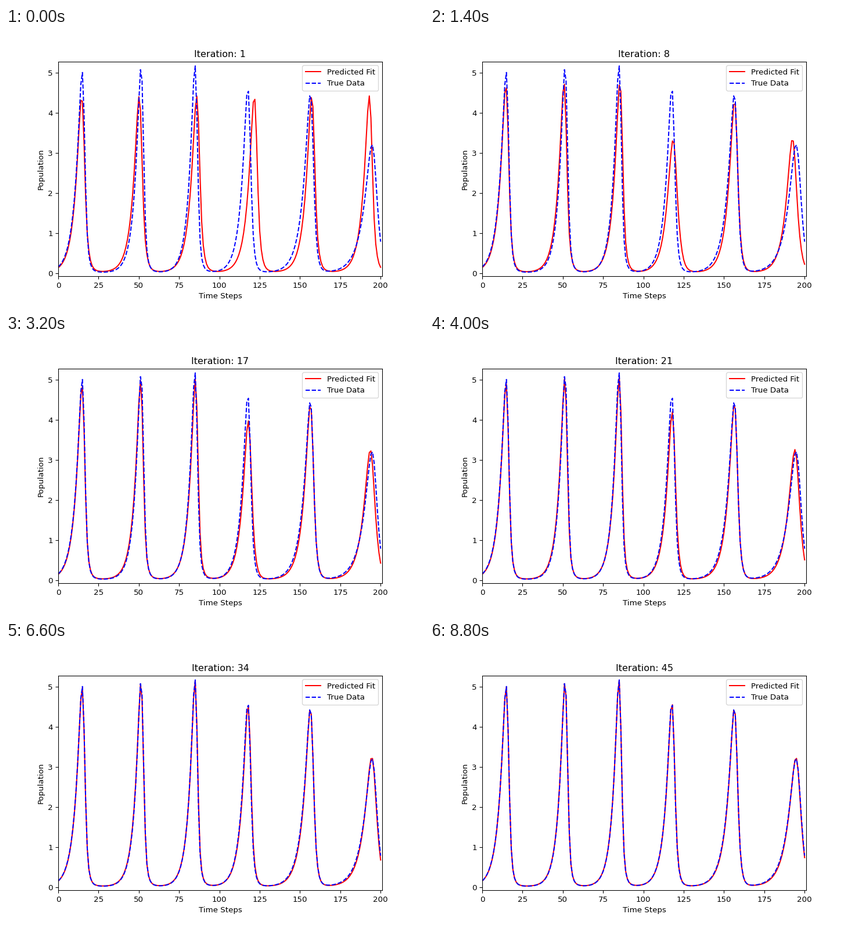
Animation, 720 px wide and 480 px high, one loop 9000 ms. Source, as a matplotlib script:

```python
import numpy as np
import matplotlib.pyplot as plt
from matplotlib.animation import FuncAnimation

FRAMES = 45
STEPS = np.arange(201)

# The data: six peaks whose growth rate drifts slowly over time
TRUE_TIME = np.array([14.8, 51.35, 84.8, 117.6, 156.4, 194.7])
TRUE_HEIGHT = np.array([5.02, 5.15, 5.19, 4.62, 4.47, 3.20])
TRUE_RISE = 0.238 + 0.055 * np.sin(2 * np.pi * TRUE_TIME / 290)

# The first guess: a strictly periodic cycle
START_TIME = 14.5 + 35.7 * np.arange(6)
START_HEIGHT = 4.40
START_RISE = 0.27

# Early overshoot of the later peaks while the fit settles
TIME_DETOUR = np.array([0, 0, 0, -1.4, -0.35, -1.3])
HEIGHT_DETOUR = np.array([0, 0, 0, -1.2, -0.13, -0.52])


def mix(a, b, amount):
    return a + (b - a) * amount


def settle(n, tau):
    """Exponential approach from 0 to 1."""
    return 1 - np.exp(-n / tau)


def population(time, height, rise, tail, floor):
    """Sum of skewed pulses with slow tails; taller pulses collapse faster."""
    time, height, rise = (np.reshape(v, (-1, 1)) for v in (time, height, rise))
    fall = 0.27 * height - 0.345
    s = STEPS - time
    body = (rise + fall) / (fall * np.exp(-rise * s) + rise * np.exp(fall * s))
    decay = tail * np.exp(-0.35 * s) / (1 + np.exp(-1.8 * (s - 4)))
    return (height * (body + decay)).sum(axis=0) + floor


def fit(n):
    """Predicted curve after n updates of the first guess."""
    done = settle(n, 11.5)
    detour = n / 6 * np.exp(1 - n / 6)
    return population(
        mix(START_TIME, TRUE_TIME, done) + TIME_DETOUR * detour,
        mix(START_HEIGHT, TRUE_HEIGHT, done) + HEIGHT_DETOUR * detour,
        mix(START_RISE, TRUE_RISE, settle(n, 22)),
        mix(0.20, 0.12, done),
        mix(0.025, 0.018, done),
    )


plt.rcParams["font.family"] = "DejaVu Sans"
fig, ax = plt.subplots(figsize=(7.5, 5), dpi=96)
fit_line, = ax.plot(STEPS, fit(0), "r-", label="Predicted Fit")
true_data = population(TRUE_TIME, TRUE_HEIGHT, TRUE_RISE, 0.12, 0.016)
ax.plot(STEPS, true_data, "b--", label="True Data")
ax.set_xlim(0, 201)
ax.set_ylim(-0.075, 5.285)
ax.set_xticks(range(0, 201, 25))
ax.set_yticks(range(6))
ax.set_xlabel("Time Steps")
ax.set_ylabel("Population")
title = ax.set_title("Iteration: 1")
ax.legend(loc="upper right")


def update(frame):
    fit_line.set_ydata(fit(frame))
    title.set_text(f"Iteration: {frame + 1}")
    return fit_line, title


anim = FuncAnimation(fig, update, frames=FRAMES, interval=200, repeat=True,
                     repeat_delay=0, blit=False)
plt.show()
```
